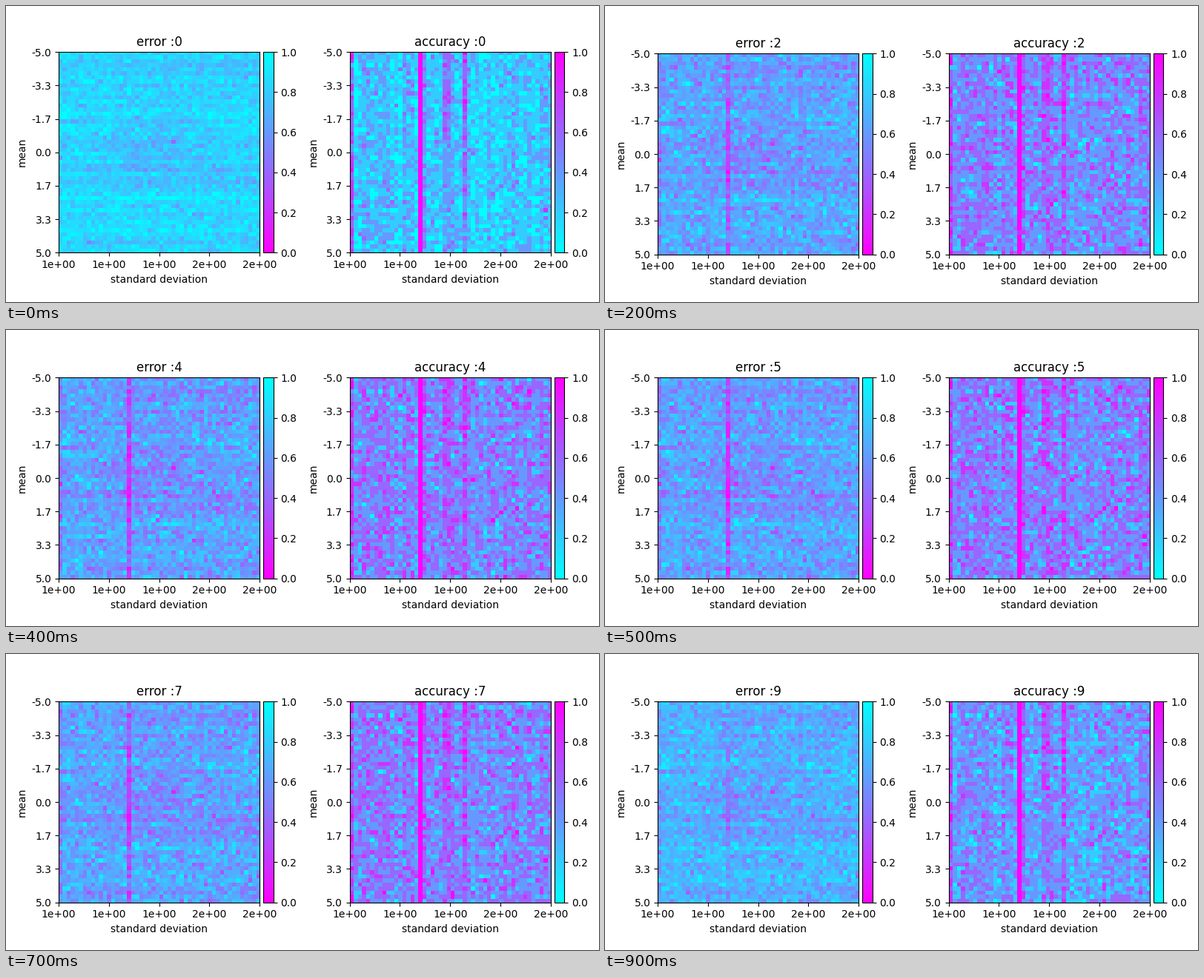
These frames come from a looping animation (800x400 px, 1 s). A matplotlib script:

```python
import numpy as np
import matplotlib.pyplot as plt
from matplotlib.animation import FuncAnimation
from mpl_toolkits.axes_grid1 import make_axes_locatable

N, EPOCHS = 50, 10
KEY_ROW, KEY_COL = 15, 17

rng = np.random.default_rng(11)
rows, cols = np.mgrid[0:N, 0:N]


def normal(*shape):
    return rng.normal(size=shape)


cell_noise = normal(2, N, N)
frame_noise = normal(2, EPOCHS, N, N)
row_shift = 0.045 * normal(N, 1)
row_shift[KEY_ROW] = 0.11
center_dip = np.exp(-((rows - 23) / 9) ** 2 - ((cols - 24) / 11) ** 2)

# Columns that learn best, some of them fading towards the lower rows.
col_boost = 0.06 * normal(1, N) + np.zeros((N, N))
for col, gain, fade in ((0, 0.45, 0), (KEY_COL, 1.3, 0), (KEY_COL + 1, 0.2, 0),
                        (23, 0.4, 0.3), (24, 0.35, 0.3), (28, 0.55, 0.3)):
    col_boost[:, col] = gain - fade * np.arange(N) / N


def learned(epoch):
    """Quick rise from 0 towards 1, with a setback at the end."""
    return 1 - np.exp(-1.2 * epoch) - 0.33 * (epoch / 9) ** 8


def noise(kind, epoch):
    return 0.9 * cell_noise[kind] + 0.43 * frame_noise[kind, epoch]


def error_map(epoch):
    skill = learned(epoch)
    values = 0.83 - 0.2 * skill + row_shift - 0.11 * center_dip
    values += (0.075 + 0.045 * skill) * noise(0, epoch)
    values[:, 0] -= 0.15 * skill
    values[:, KEY_COL] -= 0.38 * skill ** 3
    return np.clip(values, 0, 1)


def accuracy_map(epoch):
    skill = learned(epoch)
    values = 0.22 + 0.27 * skill + col_boost * (1 - 0.4 * skill)
    values += (0.14 + 0.02 * skill) * noise(1, epoch)
    return np.clip(np.round(values * 5) / 5, 0, 1)


fig, axes = plt.subplots(1, 2, figsize=(8, 4), dpi=100)


def make_panel(ax, cmap):
    image = ax.imshow(np.zeros((N, N)), cmap=cmap, vmin=0, vmax=1,
                      interpolation="nearest")
    bar_ax = make_axes_locatable(ax).append_axes("right", size="5%", pad=0.05)
    fig.colorbar(image, cax=bar_ax)
    edges = -0.5, N - 0.5
    ax.set_xticks(np.linspace(*edges, 5),
                  [f"{v:.0e}" for v in np.linspace(1, 1.98, 5)])
    ax.set_yticks(np.linspace(*edges, 7),
                  [f"{v:.1f}" for v in np.linspace(-5, 5, 7)])
    ax.set_xlabel("standard deviation")
    ax.set_ylabel("mean")
    return image


images = [make_panel(ax, cmap) for ax, cmap in zip(axes, ("cool_r", "cool"))]


def arrange(passes):
    """Tight layout settles over several passes, so start from the defaults."""
    fig.subplots_adjust(left=0.125, right=0.9, bottom=0.11, top=0.88,
                        wspace=0.2, hspace=0.2)
    for _ in range(passes):
        fig.tight_layout()


def update(epoch):
    for ax, image, name, values_at in zip(axes, images, ("error", "accuracy"),
                                          (error_map, accuracy_map)):
        image.set_data(values_at(epoch))
        ax.set_title(f"{name} :{epoch}")
    arrange(2 if epoch == 0 else 3)
    return images


anim = FuncAnimation(fig, update, frames=EPOCHS, interval=100, repeat=True)
plt.show()
```
